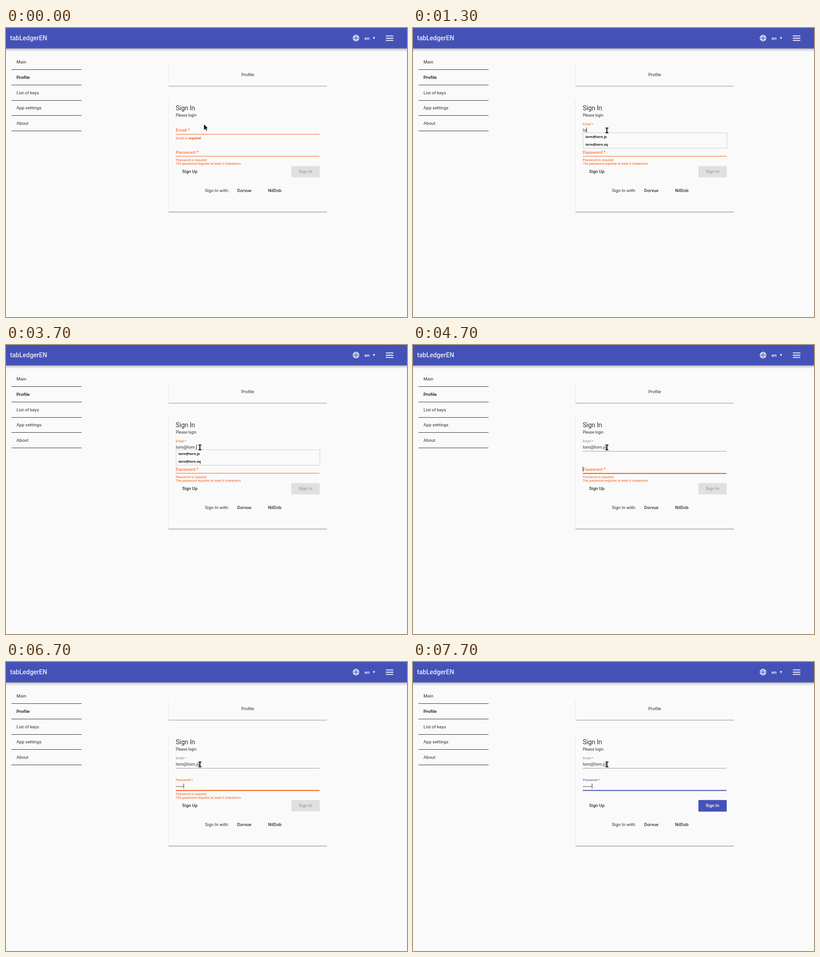
Write an HTML page that moves like this. It is 881x636 px and loops after 8000 ms.

```html
<!DOCTYPE html>
<html lang="en">
<head>
<meta charset="utf-8">
<title>Sign in form</title>
<style>
  html, body { margin: 0; width: 100%; height: 100%; overflow: hidden; background: #fafafa; }
  svg { display: block; width: 881px; height: 636px; }
  text { font: 400 9.8px Roboto, sans-serif; fill: #303030; white-space: pre; }
  .medium { font-weight: 500; }
  .title { font-size: 14px; }
  .sub { font-size: 8.4px; }
  .small { font-size: 7.35px; }
  .error { font-size: 7.35px; fill: #f9560f; }
  .hint { font: 700 7.7px "Open Sans", sans-serif; fill: #111; }
</style>
</head>
<body>
<svg id="stage" viewBox="0 0 881 636">
  <defs>
    <linearGradient id="shade" x1="0" y1="0" x2="0" y2="1">
      <stop offset="0" stop-color="#000" stop-opacity=".42"/>
      <stop offset=".3" stop-color="#000" stop-opacity=".15"/>
      <stop offset="1" stop-color="#000" stop-opacity="0"/>
    </linearGradient>
  </defs>
  <rect width="881" height="636" fill="#fafafa"/>

  <rect y="44.5" width="881" height="8" fill="url(#shade)"/>
  <rect width="881" height="44.8" fill="#4452b7"/>
  <text class="title medium" x="9" y="27.2" style="fill:#e9ebf8">tabLedgerEN</text>
  <g fill="none" stroke="#fff" stroke-width="1.3">
    <circle cx="769" cy="22.3" r="6.4"/>
    <ellipse cx="769" cy="22.3" rx="2.9" ry="6.4"/>
    <path d="M763.2 19.9h11.6M763.2 24.7h11.6"/>
    <path d="M834.5 17.4H851M834.5 22.5H851M834.5 27.4H851" stroke-width="1.8"/>
  </g>
  <text x="787.8" y="26" style="font:700 9.4px 'Liberation Sans',sans-serif;fill:#fff">en</text>
  <path d="M806 20.2h5l-2.5 4.6z" fill="#fff"/>

  <g id="menu"></g>

  <g fill="none">
    <path d="M356.5 84V127M356.5 157V404" stroke="#e6e6e6"/>
    <path d="M357 127.8H705M357 405H705" stroke="#9c9c9c" stroke-width="1.3"/>
    <path d="M358 129H704M358 406.2H704" stroke="#e2e2e2"/>
  </g>
  <text x="531" y="106.4" text-anchor="middle">Profile</text>

  <text class="title" x="373" y="180.6">Sign In</text>
  <text class="sub" x="373" y="194.5">Please login</text>
  <g id="fields"></g>

  <text class="error" id="emailError" x="373" y="244.8">Email is <tspan font-weight="700">required</tspan></text>
  <g id="passError">
    <text class="error" x="373" y="293.3">Password is <tspan font-style="italic">required</tspan></text>
    <text class="error" x="373" y="301">The password requires at least 6 characters</text>
  </g>

  <text class="medium" x="387" y="319.2">Sign Up</text>
  <rect id="buttonShade" x="627" y="305" width="62.2" height="25" rx="1.5" fill="#bbb"/>
  <rect id="button" x="627" y="303.8" width="62.2" height="25" rx="1.5"/>
  <text class="medium" id="buttonText" x="658" y="319.2" text-anchor="middle">Sign In</text>
  <text x="437" y="361.2">Sign In with:</text>
  <text class="medium" x="508" y="361.2">Dorvue</text>
  <text class="medium" x="575.8" y="361.2">NilDob</text>

  <g id="hints">
    <rect id="hintBox" x="373.5" y="230.5" width="316" fill="#fafafa" stroke="#cdcdcd"/>
    <text class="hint" x="379" y="242.2">lorn@lorn.js</text>
    <text class="hint" id="hint2" x="379" y="258.9">lorn@lorn.zq</text>
  </g>

  <path id="arrow" d="M0 0V12.6L2.9 9.9L5 14.4L7.2 13.4L5.2 9.1H8.9Z" fill="#000" stroke="#fff" stroke-width=".5"/>
  <path id="beam" d="M-3.2 -5.2H3.2M-3.2 5.2H3.2M0 -5.2V5.2" fill="none" stroke="#000" stroke-width="1.9"/>
</svg>
<script>
const $ = id => document.getElementById(id);
const LOOP = 8000, LEFT = 373;
const ORANGE = '#f9560f', BLUE = '#4452b7', GRAY = '#858585';
const ADDRESS = 'lorn@lorn.js';

// [time, number of characters]
const emailKeys = [[1100, 1], [1300, 2], [1500, 4], [1700, 5], [2100, 7], [2500, 6], [2700, 7],
  [2900, 8], [3100, 9], [3700, 10], [4100, 11], [4500, 12]];
const passKeys = [[5500, 1], [5900, 2], [6100, 3], [6300, 4], [6700, 5], [6900, 6]];
const typed = (keys, t) => keys.reduce((n, [at, count]) => t >= at ? count : n, 0);

function add(parent, tag, attrs, text = '') {
  const el = document.createElementNS('http://www.w3.org/2000/svg', tag);
  for (const key in attrs) el.setAttribute(key, attrs[key]);
  el.textContent = text;
  return parent.appendChild(el);
}
const show = (el, on) => el.style.display = on ? '' : 'none';
const place = (el, x, y) => el.setAttribute('transform', `translate(${x} ${y})`);

['Main', 'Profile', 'List of keys', 'App settings', 'About'].forEach((name, i) => {
  const y = 78.4 + i * 33.6;
  add($('menu'), 'text', { x: 23, y, 'font-weight': 400, style: i === 1 ? 'font-weight:700' : '' }, name);
  add($('menu'), 'rect', { x: 12, y: Math.round(y + 13), width: 154, height: 1, fill: '#333' });
});

function makeField(name, y) {
  const g = $('fields');
  const label = add(g, 'text', { x: LEFT });
  const word = add(label, 'tspan', {}, name);
  const star = add(label, 'tspan', {}, ' *');
  const value = add(g, 'text', { x: LEFT, y });
  const line = add(g, 'rect', { x: LEFT, y: y + 5.2, width: 315.7 });
  const caret = add(g, 'rect', { y: y - 9, width: 1, height: 11, fill: '#222' });
  return ({ text, color, starColor = color, lineColor = color, floated, focused }) => {
    label.setAttribute('y', floated ? y - 14.7 : y);
    label.style.fontSize = floated ? '7.35px' : '9.8px';
    word.style.fill = color;
    star.style.fill = starColor;
    value.textContent = text;
    line.setAttribute('fill', lineColor);
    line.setAttribute('height', focused ? 2 : 1);
    show(caret, focused);
    const width = text ? value.getComputedTextLength() : 0;
    caret.setAttribute('x', Math.round(LEFT + width));
  };
}
const email = makeField('Email', 228.2);
const password = makeField('Password', 276.5);

function mix(a, b, k) {
  return `rgb(${a.map((v, i) => Math.round(v + (b[i] - v) * k))})`;
}

function drawPointer(t) {
  show($('arrow'), t < 300);
  show($('beam'), t >= 300);
  place($('arrow'), t < 100 ? 434.8 : 432, t < 100 ? 211.8 : 215);
  place($('beam'), t < 500 ? 428 : 426, t < 500 ? 222.5 : 225.3);
}

function draw(t) {
  const chars = typed(emailKeys, t), dots = typed(passKeys, t);
  const onEmail = t >= 700 && t < 4700, onPass = t >= 4700;
  const valid = chars >= 6 && chars !== 10;

  email({
    text: ADDRESS.slice(0, chars),
    color: onPass ? GRAY : valid ? BLUE : ORANGE,
    starColor: onPass ? GRAY : ORANGE,
    lineColor: onPass ? '#949494' : valid ? BLUE : ORANGE,
    floated: t >= 900,
    focused: onEmail
  });
  password({
    text: '•'.repeat(dots),
    color: dots === 6 ? BLUE : ORANGE,
    starColor: ORANGE,
    floated: t >= 4900,
    focused: onPass
  });

  show($('emailError'), !chars);
  show($('passError'), dots < 6);
  show($('hints'), t >= 1300 && t < 4500);
  show($('hint2'), chars < 11);
  $('hintBox').setAttribute('height', chars < 11 ? 34 : 17.5);

  const k = Math.min(1, Math.max(0, (t - 6700) / 400));
  $('button').setAttribute('fill', mix([224, 224, 224], [68, 82, 183], k));
  $('buttonText').style.fill = mix([160, 160, 160], [255, 255, 255], k);
  $('buttonShade').style.opacity = k;
  drawPointer(t);
}

// The screen refreshes every 200 ms, on odd hundreds.
function tick(now) {
  const t = now % LOOP;
  draw(Math.max(0, Math.floor((t - 100) / 200) * 200 + 100));
  requestAnimationFrame(tick);
}
draw(0);
requestAnimationFrame(tick);
</script>
</body>
</html>
```
